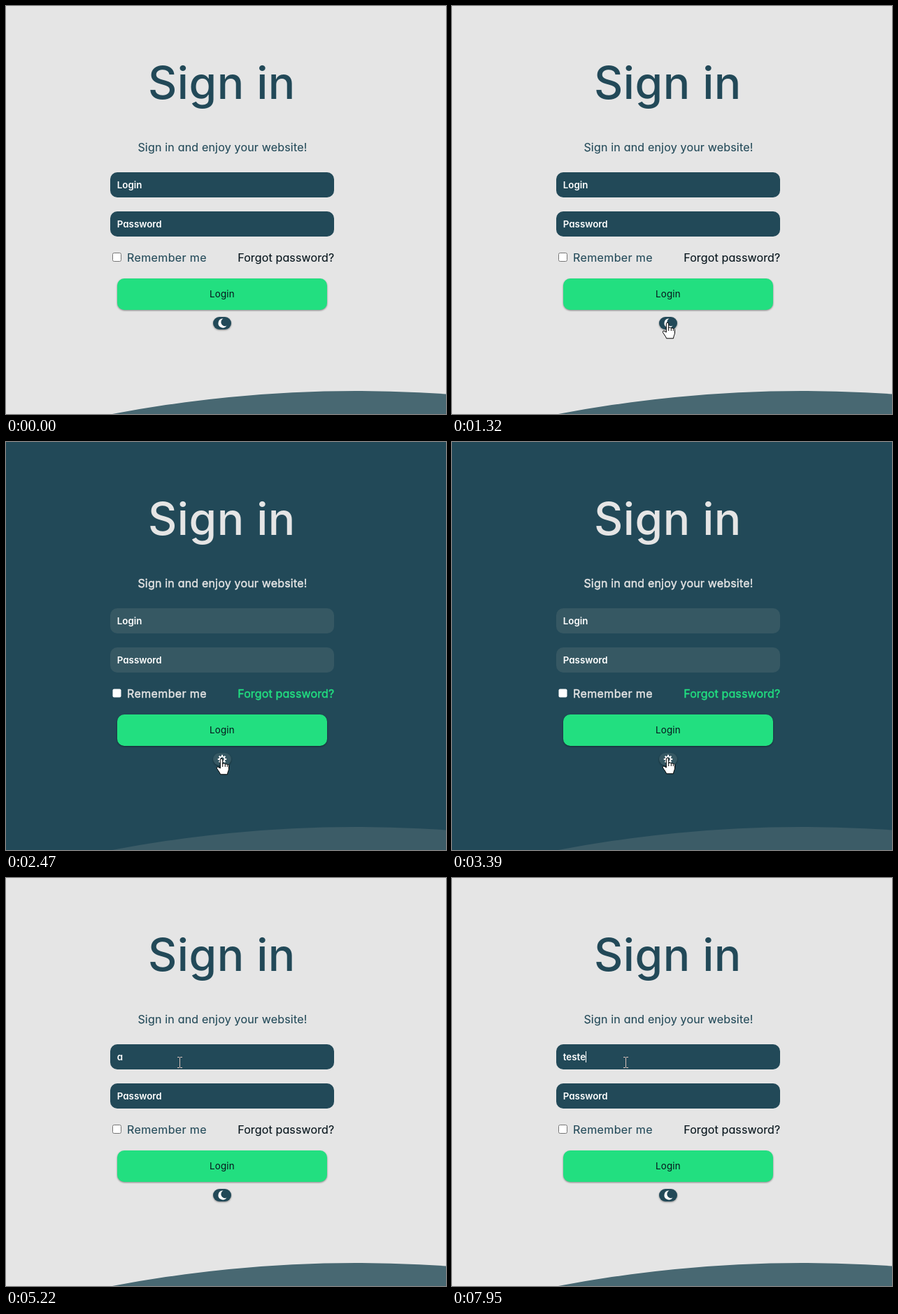
An HTML page for the animation above (8 s loop, 629 by 584 pixels).

```html
<!DOCTYPE html>
<html lang="en">
<head>
<meta charset="utf-8">
<title>Sign in</title>
<style>
  html, body { margin: 0; width: 629px; height: 584px; overflow: hidden; }
  svg {
    display: block;
    --bg: #e5e5e5; --ink: #224958; --field: #224958; --wave: #486872;
    --link: #07151c; --box: #767676; --bold: .12px;
    background: var(--bg);
    font: 400 16px Inter, "Open Sans", sans-serif;
    font-optical-sizing: none;
    font-feature-settings: "cv11";
  }
  svg.dark {
    --bg: #224958; --ink: #e5e5e5; --field: #365863; --wave: #3c5c67;
    --link: #22df80; --box: none; --bold: .42px;
  }
  text { fill: var(--ink); white-space: pre; }
  .title { font-size: 64px; font-weight: 500; letter-spacing: .5px; }
  .body { stroke: var(--ink); stroke-width: var(--bold); }
  .link { fill: var(--link); stroke: var(--link); }
  .field { fill: var(--field); }
  .input { fill: #fff; font-size: 13.333px; font-weight: 600; }
  .label { fill: #07151c; font-size: 13.333px; letter-spacing: .2px; }
  .raised { filter: drop-shadow(0 1px 1.2px rgba(0, 0, 0, .42)); }
  .sun, .dark .moon { display: none; }
  .dark .sun { display: inline; }
  .cursor { fill: #fff; stroke: #000; stroke-linejoin: round; }
</style>
</head>
<body>
<svg id="stage" width="629" height="584" viewBox="0 0 629 584">
  <circle cx="500" cy="2402" r="1851" fill="var(--wave)"/>

  <text class="title" x="203" y="133">Sign in</text>
  <text class="body" x="188.4" y="208" letter-spacing=".19">Sign in and enjoy your website!</text>

  <rect class="field" x="149" y="238" width="320" height="36" rx="10"/>
  <rect class="field" x="149" y="294" width="320" height="36" rx="10"/>
  <text class="input" id="login" x="158.8" y="261">Login</text>
  <rect id="caret" y="248" width="1" height="16" fill="#fff"/>
  <text class="input" x="158.8" y="317">Password</text>

  <rect x="152.5" y="353.5" width="12" height="12" rx="2" fill="#fff" stroke="var(--box)"/>
  <text class="body" x="173" y="366" letter-spacing=".38">Remember me</text>
  <text class="body link" x="331.2" y="366" letter-spacing=".14">Forgot password?</text>

  <rect class="raised" x="159" y="390" width="300" height="45" rx="10" fill="#22df80"/>
  <text class="label" x="291" y="417">Login</text>

  <rect class="field raised" x="296" y="445" width="26" height="18" rx="9"/>
  <path class="moon" fill="#fff" d="M310.5 447.4A6.6 6.6 0 1 0 315.6 457.6A5.6 5.6 0 0 1 310.5 447.4Z"/>
  <g class="sun" fill="none" stroke="#fff" transform="translate(309 454)">
    <circle r="3.6" stroke-width="1.8"/>
    <path id="rays" stroke-width="2"/>
  </g>

  <g class="cursor" id="cursor">
    <path id="arrow" d="M.5.5V16.5L4.2 13 6.7 18.8 9 17.8 6.5 12.2H11.5Z"/>
    <g id="hand">
      <path d="M-1.7 14V1.9a1.7 1.7 0 0 1 3.4 0V8c.3-1.3 3.3-1.3 3.6.5c.4-1 2.8-.8 3 .7c.5-.8 2.2-.4 2.2 1.2v4.6c0 2-1.7 4-2 7.8H-1.5c-.4-2.5-3-4.8-5-8.5c-.9-1.7 1-3 2.5-1.7Z"/>
      <path fill="none" d="M1.7 7.5V12M5.3 8.5V12M8.3 9.5V12"/>
    </g>
    <path id="beam" fill="none" stroke="#d9c3bb" d="M-3-7.5H0M1-7.5H4M.5-7V7M-3 7.5H0M1 7.5H4"/>
  </g>
</svg>
<script>
const LOOP = 8000;
const $ = id => document.getElementById(id);
const stage = $('stage'), login = $('login'), caret = $('caret'), cursor = $('cursor');
const pointers = ['arrow', 'hand', 'beam'].map($);

// time, x, y of the pointer tip
const path = [
  [410, 514, 399], [690, 452, 402], [900, 380, 418], [1040, 344, 433],
  [1180, 317, 451], [1250, 311, 453], [1320, 308, 453], [3389, 308, 453],
  [3390, 308, 452], [3460, 308, 452], [3800, 275, 340], [3940, 262, 300],
  [4140, 250, 268], [4339, 250, 268], [4340, 249, 266], [4449, 249, 266],
  [4450, 248, 264], [LOOP, 248, 264]
];

// time, typed value, caret shown
const typing = [
  [0, '', 0], [4560, '', 1], [4670, 'a', 1], [5220, 'a', 0], [5420, '', 1],
  [5750, 't', 1], [5880, 'te', 1], [6340, 't', 1], [6450, '', 1],
  [6560, 't', 1], [6670, 'te', 1], [6870, 'tes', 1], [7070, 'test', 1],
  [7270, 'testee', 1], [7680, 'teste', 1], [7770, 'test', 1], [7950, 'teste', 1]
];

$('rays').setAttribute('d', Array.from({ length: 8 }, (_, i) => {
  const a = i * Math.PI / 4, x = Math.cos(a), y = Math.sin(a);
  return `M${4 * x} ${4 * y}L${6.2 * x} ${6.2 * y}`;
}).join(''));

const last = (rows, t) => rows.findLastIndex(row => row[0] <= t);
const hold = (t, start) => start + Math.floor((t - start) / 70) * 70;
const inside = (x, y, l, t, r, b) => x >= l && x <= r && y >= t && y <= b;

function pointerAt(t) {
  if (t >= 410 && t < 1320) t = hold(t, 410);
  else if (t >= 3460 && t < 4140) t = hold(t, 3460);
  const i = last(path, t), [t0, x0, y0] = path[i];
  const [t1, x1, y1] = path[i + 1];
  const k = (t - t0) / (t1 - t0);
  return [Math.round(x0 + (x1 - x0) * k), Math.round(y0 + (y1 - y0) * k)];
}

function pointerKind(x, y) {
  if (inside(x, y, 159, 390, 459, 435) || inside(x, y, 296, 445, 322, 463)) return 'hand';
  if (inside(x, y, 149, 238, 469, 274) || inside(x, y, 149, 294, 469, 330)) return 'beam';
  return 'arrow';
}

function draw(t) {
  stage.classList.toggle('dark', t >= 2470 && t < 3460);

  const [, value, shown] = typing[last(typing, t)];
  const text = value || 'Login';
  if (login.textContent !== text) login.textContent = text;
  const end = value ? login.getComputedTextLength() : 0;
  caret.setAttribute('x', 159 + Math.floor(end));
  caret.style.display = shown ? '' : 'none';

  cursor.style.display = t < 410 ? 'none' : '';
  if (t < 410) return;
  const [x, y] = pointerAt(t), kind = pointerKind(x, y);
  cursor.setAttribute('transform', `translate(${x} ${y})`);
  for (const p of pointers) p.style.display = p.id === kind ? '' : 'none';
}

const start = performance.now();
function tick() {
  draw((performance.now() - start) % LOOP);
  requestAnimationFrame(tick);
}
tick();
</script>
</body>
</html>
```
